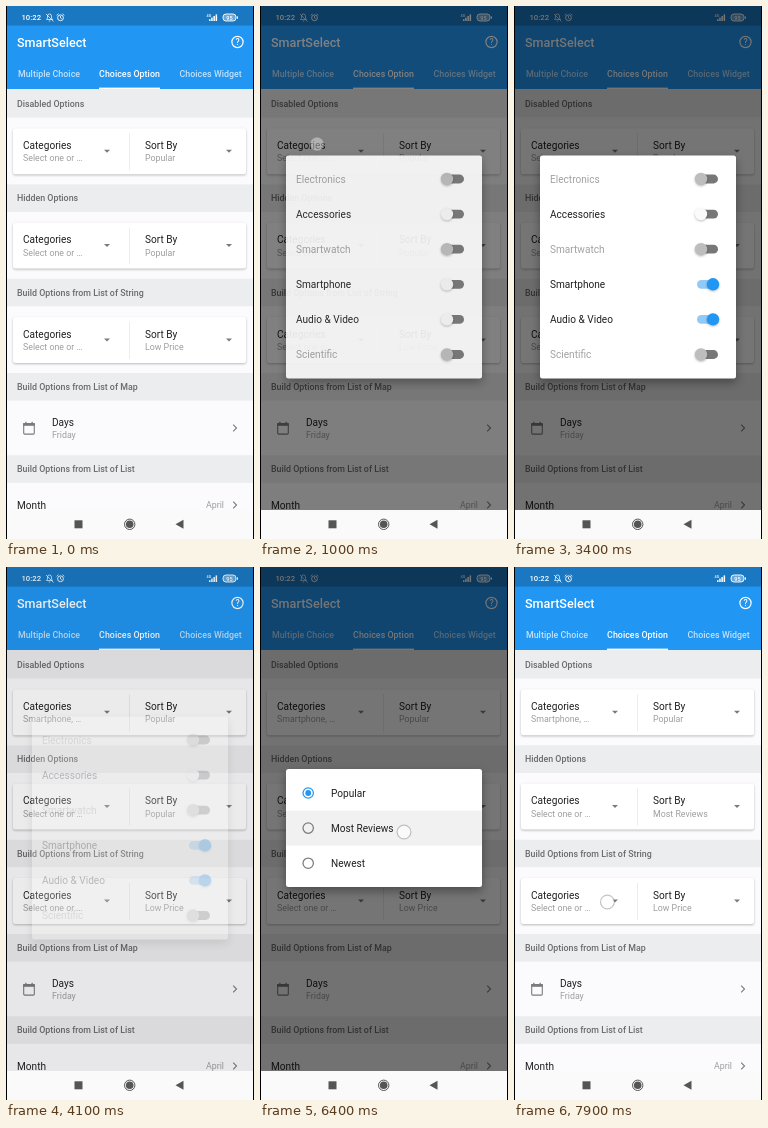
Recreate the animation shown at these times as an HTML page. Size 248x533 px, loop 8 s.

```html
<!DOCTYPE html>
<html lang="en">
<head>
<meta charset="utf-8">
<title>Choices Option</title>
<style>
  html, body { margin: 0; width: 100%; height: 100%; overflow: hidden; background: #fafafa; }
  svg { display: block; width: 100vw; height: 100vh; font-family: Roboto, sans-serif; }
  .sheet { filter: drop-shadow(0 4px 5px rgba(0, 0, 0, .35)); }
  .card { filter: drop-shadow(0 1.2px .9px rgba(0, 0, 0, .26)); }
</style>
</head>
<body>
<svg id="stage" viewBox="0 0 248 533"></svg>
<script>
const LOOP = 8000, STEP = 100, FADE = 150;
const BLUE = '#2196f3', INK = '#212121', GREY = '#9e9e9e', ICON = '#7b7b7b';
const BODY = 8.83, LARGE = 10.1, ROW = 35.1;
const stage = document.getElementById('stage');

// Shape helpers; text is placed by the vertical centre of its capitals.
const rect = (x, y, w, h, fill, extra = '') =>
  `<rect x="${x}" y="${y}" width="${w}" height="${h}" fill="${fill}" ${extra}/>`;
const circle = (x, y, r, fill, extra = '') =>
  `<circle cx="${x}" cy="${y}" r="${r}" fill="${fill}" ${extra}/>`;
const path = (d, fill, extra = '') => `<path d="${d}" fill="${fill}" ${extra}/>`;
const line = (d, color, width = 1) => path(d, 'none', `stroke="${color}" stroke-width="${width}"`);
const text = (x, y, s, size, fill, extra = '') =>
  `<text x="${x}" y="${y + size * .355}" font-size="${size}" fill="${fill}" ${extra}>${s}</text>`;
const group = (id, content, extra = '') => `<g id="${id}" ${extra}>${content}</g>`;
const medium = 'font-weight="500"';
const middle = 'text-anchor="middle"';

const header = (y, label) =>
  rect(0, y, 248, 27.5, '#ecedef') + text(11, y + 13.9, label, BODY, '#6b6b6b', medium);

const dropdown = (x, y, title, value, arrowX, id) =>
  text(x, y - 6, title, LARGE, INK) +
  text(x, y + 7, value, BODY, GREY, `id="${id}"`) +
  path(`M${arrowX - 3} ${y - 1.5}h6l-3 3z`, ICON);

const card = (y, id, sort) =>
  rect(7, y - 23, 233, 46, '#fff', 'rx="2.5" class="card"') +
  line(`M123.5 ${y - 18}v37`, '#e6e6e6', .7) +
  group(id + 'Ink', '') +
  dropdown(17, y, 'Categories', 'Select one or …', 101, id + 'Category') +
  dropdown(139, y, 'Sort By', sort, 223, id + 'Sort');

const chevron = y => line(`M227.2 ${y - 3.3}l3.3 3.3l-3.3 3.3`, ICON, 1.1);

const statusBar = () =>
  rect(0, 0, 248, 19.6, 'rgba(0,0,0,.2)') +
  text(15.5, 11.3, '10:22', 7.7, '#fff', medium) +
  line('M40.5 13.5h6l-1-1.5v-2a2 2 0 0 0-4 0v2zM42.8 15h1.4M40 8l7.5 7.5', '#fff', .7) +
  circle(54.5, 11.8, 2.9, 'none', 'stroke="#fff" stroke-width=".9"') +
  line('M54.5 10v2l1.3.8M50.7 9.3l1.8-1.5M58.3 9.3l-1.8-1.5', '#fff', .8) +
  text(200.5, 9.3, '4G', 3.8, '#fff', medium) +
  [0, 1, 2, 3].map(i => rect(203 + i * 2.2, 13.2 - i * 1.6, 1.5, 1.8 + i * 1.6, '#fff')).join('') +
  rect(217, 8, 13, 7, 'rgba(255,255,255,.35)', 'rx="3" stroke="#fff" stroke-width=".9"') +
  rect(230.8, 10.2, 1.2, 2.6, '#fff', 'rx=".6"') +
  text(223.5, 11.6, '95', 5.6, '#fff', `${middle} ${medium}`);

const appBar = () =>
  rect(0, 0, 248, 83, BLUE) + statusBar() +
  text(11, 36.3, 'SmartSelect', 12.6, '#fff', medium) +
  circle(231.5, 36, 5.6, 'none', 'stroke="#fff" stroke-width="1.2"') +
  text(231.5, 36.1, '?', 8.6, '#fff', `${middle} ${medium}`) +
  [['Multiple Choice', 43, .72], ['Choices Option', 123.5, 1], ['Choices Widget', 204.7, .72]]
    .map(([label, x, alpha]) => text(x, 68, label, BODY, '#fff',
      `${middle} ${medium} opacity="${alpha}" letter-spacing=".04"`)).join('') +
  rect(93, 81.6, 61, 1.4, '#fff');

const page = () =>
  rect(0, 0, 248, 533, '#fbfafc') + header(84, 'Disabled Options') +
  rect(0, 83, 248, 1, '#ecedef') + appBar() + card(145.2, 'first', 'Popular') +
  header(178.4, 'Hidden Options') + card(239.5, 'second', 'Popular') +
  header(272.7, 'Build Options from List of String') + card(334, 'third', 'Low Price') +
  header(367, 'Build Options from List of Map') +
  rect(17.7, 417.5, 10.6, 10.6, 'none', `rx="1" stroke="${ICON}" stroke-width="1.1"`) +
  rect(17.2, 417, 11.6, 2.8, ICON) + rect(19.2, 415.8, 1.3, 2, ICON) + rect(25.5, 415.8, 1.3, 2, ICON) +
  text(46, 416, 'Days', LARGE, INK) + text(46, 429.2, 'Friday', BODY, GREY) + chevron(422) +
  header(449.3, 'Build Options from List of List') +
  text(11, 499, 'Month', LARGE, INK) +
  text(218, 499, 'April', BODY, GREY, 'text-anchor="end"') + chevron(499);

const navBar = () =>
  rect(0, 504, 248, 29, '#fafafa') +
  rect(68.5, 514.3, 8, 8, '#555') +
  circle(123.7, 518.3, 5.2, 'none', 'stroke="#555" stroke-width="1"') +
  circle(123.7, 518.3, 3.8, '#555') +
  path('M169.5 518.3l8-4.5v9z', '#555');

const screenEdges = () => rect(0, 0, 1, 533, '#000') + rect(247, 0, 1, 533, '#000');

const sheet = (id, y, h, content) =>
  group(id, rect(26, y, 196, h, '#fff', 'rx="2.5" class="sheet"') + content, 'opacity="0"');

const switchRow = ([label, disabled], i) => {
  const y = 173 + i * ROW;
  return rect(26, y - ROW / 2, 196, ROW, '#000', `id="press${i}" opacity="0"`) +
    text(36, y, label, LARGE, disabled ? '#a2a2a2' : INK) +
    rect(183, y - 4.4, 21, 8.8, '#777', `rx="4.4" id="track${i}"`) +
    circle(187, y, 6.2, disabled ? '#bdbdbd' : '#fafafa', `id="thumb${i}" class="card"`);
};

const radioRow = (label, i) => {
  const y = 226 + i * ROW;
  return rect(26, y - ROW / 2, 196, ROW, '#000', `id="radioPress${i}" opacity="0"`) +
    circle(48.2, y, 5.2, 'none', `id="ring${i}" stroke="${ICON}" stroke-width="1.25"`) +
    circle(48.2, y, 2.9, BLUE, `id="dot${i}" opacity="0"`) +
    text(71, y, label, LARGE, INK);
};

const switches = [
  ['Electronics', true], ['Accessories', false], ['Smartwatch', true],
  ['Smartphone', false], ['Audio &amp; Video', false], ['Scientific', true],
];
const radios = ['Popular', 'Most Reviews', 'Newest'];

stage.innerHTML = page() +
  rect(0, 0, 248, 504, '#000', 'id="barrier"') +
  sheet('categorySheet', 149.5, 223, switches.map(switchRow).join('')) +
  sheet('sortSheet', 202, 118, radios.map(radioRow).join('')) +
  navBar() + group('touch', '') + screenEdges();

const el = id => document.getElementById(id);
const set = (id, attrs) => {
  for (const name in attrs) el(id).setAttribute(name, attrs[name]);
};
const progress = (t, start, length) => Math.min(1, Math.max(0, (t - start) / length));
const easeOut = u => 1 - (1 - u) ** 2;
const easeBoth = u => 1 - (1 - u ** 1.5) ** 3.2;
const shown = (t, open, close) =>
  t < close ? progress(t, open, FADE) : 1 - progress(t, close, FADE);
const pulse = (t, start, peak, end) =>
  progress(t, start, peak - start) * (1 - progress(t, peak, end - peak));

const OPEN_CATEGORY = 900, CLOSE_CATEGORY = 3970, OPEN_SORT = 5262, CLOSE_SORT = 6540;
const touches = [
  { x: 57, y: 138, start: 790, end: 1060 },
  { x: 120, y: 313, start: 1700, end: 1950 },
  { x: 120, y: 279, start: 2350, end: 2600 },
  { x: 180, y: 238, start: 5262, end: 5480 },
  { x: 144, y: 265, start: 6190, end: 6520 },
  { x: 93.4, y: 335, start: 7790, end: 8200 },
];

function drawTouch(t) {
  const active = touches.find(p => t >= p.start && t < p.end);
  el('touch').innerHTML = active
    ? circle(active.x, active.y, 6.9, 'rgba(255,255,255,.65)',
      `stroke="rgba(110,110,110,.4)" stroke-width="1.2" opacity="${1 - progress(t, active.end - 100, 100)}"`)
    : '';
}

function drawInk(id, t, { x, y, start }) {
  const age = t - start, alpha = .14 * (1 - progress(age, 80, 120));
  el(id).innerHTML = age >= 0 && alpha > 0
    ? circle(x, y, 18 + 12 * progress(age, 0, 200), '#000', `opacity="${alpha}"`) : '';
}

function drawSwitch(i, t, start) {
  const on = easeOut(progress(t, start, 200));
  set('thumb' + i, { cx: 187 + 12 * on, fill: on > .4 ? BLUE : '#fafafa' });
  set('track' + i, { fill: on > .4 ? '#90caf9' : '#777' });
  set('press' + i, { opacity: .06 * pulse(t, start - 100, start + 50, start + 450) });
}

function draw(t) {
  const category = shown(t, OPEN_CATEGORY, CLOSE_CATEGORY);
  const sort = shown(t, OPEN_SORT, CLOSE_SORT);
  set('barrier', { opacity: .54 * easeBoth(Math.max(category, sort)) });
  set('categorySheet', { opacity: easeOut(category) });
  set('sortSheet', { opacity: easeOut(sort) });

  drawSwitch(4, t, 1800);
  drawSwitch(3, t, 2480);

  const picked = t >= 6500 ? 1 : 0;
  radios.forEach((_, i) => {
    set('ring' + i, { stroke: i === picked ? BLUE : ICON });
    set('dot' + i, { opacity: +(i === picked) });
  });
  set('radioPress1', { opacity: .06 * pulse(t, 6190, 6350, 6900) });

  el('firstCategory').textContent = t >= CLOSE_CATEGORY ? 'Smartphone, …' : 'Select one or …';
  el('secondSort').textContent = t >= CLOSE_SORT ? 'Most Reviews' : 'Popular';
  drawInk('firstInk', t, touches[0]);
  drawInk('secondInk', t, touches[3]);
  drawTouch(t);
}

const begin = performance.now();
function tick() {
  const t = (performance.now() - begin) % LOOP;
  draw(Math.floor(t / STEP) * STEP);
  requestAnimationFrame(tick);
}
tick();
</script>
</body>
</html>
```
